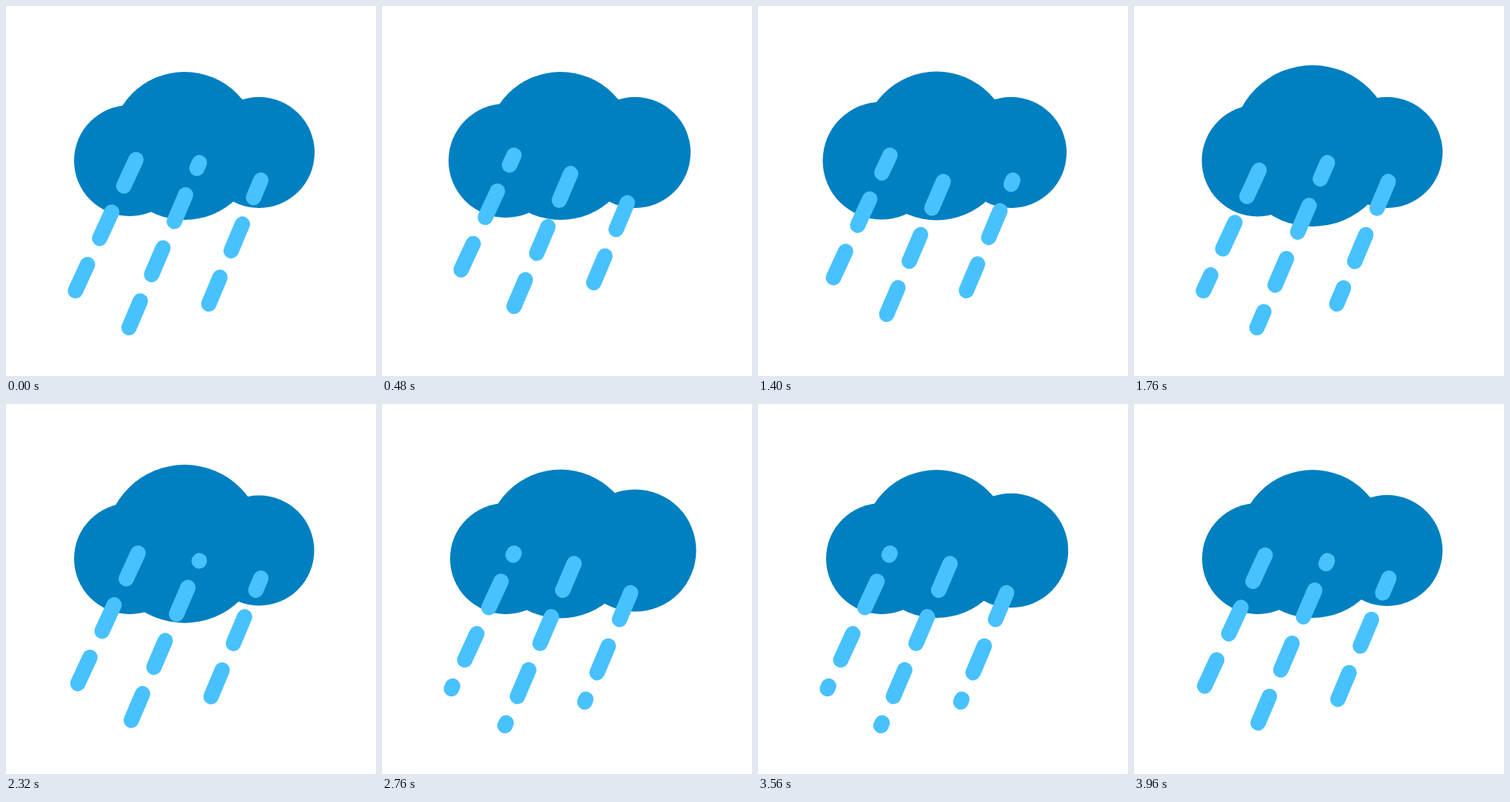
An HTML page that plays this animation: 500 px wide and 500 px high, repeating every 4000 ms.

```html
<!DOCTYPE html>
<html lang="en">
<head>
<meta charset="utf-8">
<title>Rain cloud</title>
<style>
  html, body { margin: 0; width: 100%; height: 100%; overflow: hidden; background: #fff; }
  svg { display: block; width: 100%; height: 100%; }
  .cloud { fill: #0080c0; }
  .rain { stroke: #48c1ff; stroke-width: 20.8; stroke-linecap: round; stroke-dasharray: 39; }
</style>
</head>
<body>
<svg viewBox="0 0 500 500">
  <g class="cloud">
    <circle cx="167" cy="209" r="75"/>
    <circle cx="241.3" cy="189" r="100"/>
    <circle cx="342" cy="198" r="75"/>
  </g>
  <g class="rain">
    <path d="M93.8 384.8 L178.4 201.6"/>
    <path d="M166.2 434.6 L261.2 211.8"/>
    <path d="M274 402.6 L344.4 235.4"/>
  </g>
</svg>
<script>
const LOOP = 4000, HALF_PULSE = 1000;
const RAIN_PERIOD = 800, DASH_CYCLE = 78;

const puffs = [...document.querySelectorAll('circle')];
const rain = document.querySelector('.rain');
const restRadius = [75, 100, 75];
const growth = [8.3, 10, 8.5];

function bezier(x1, y1, x2, y2) {
  const curve = (a, b, s) => 3 * a * s * (1 - s) ** 2 + 3 * b * s * s * (1 - s) + s ** 3;
  return x => {
    let low = 0, high = 1;
    for (let i = 0; i < 30; i++) {
      const mid = (low + high) / 2;
      if (curve(x1, x2, mid) < x) low = mid; else high = mid;
    }
    return curve(y1, y2, low);
  };
}

// A slight shrink before swelling, and a soft settle afterwards.
const swell = bezier(0.6, -0.5, 0.4, 1);
const settle = bezier(0.35, 0, 0.5, 1.1);

function pulse(time) {
  const phase = time / HALF_PULSE;
  if (phase <= 0 || phase >= 2) return 0;
  return phase < 1 ? swell(phase) : 1 - settle(phase - 1);
}

function draw(now) {
  const time = now % LOOP;
  puffs.forEach((puff, i) =>
    puff.setAttribute('r', restRadius[i] + growth[i] * pulse(time - i * HALF_PULSE)));
  rain.style.strokeDashoffset = time % RAIN_PERIOD / RAIN_PERIOD * DASH_CYCLE;
}

let start;
function tick(now) {
  start ??= now;
  draw(now - start);
  requestAnimationFrame(tick);
}
draw(0);
requestAnimationFrame(tick);
</script>
</body>
</html>
```
